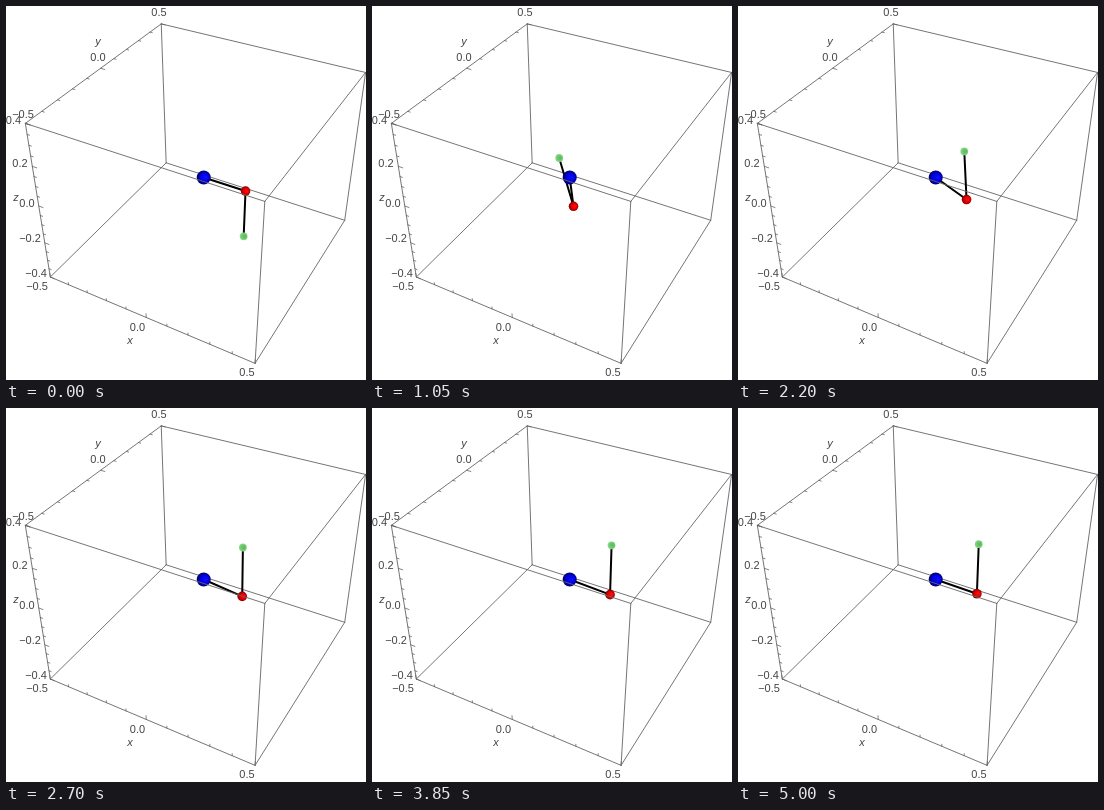
Write an HTML page with a canvas that moves like this. It is 360 by 374 pixels and loops after 5.05 s.

```html
<!DOCTYPE html>
<html>
<head>
<meta charset="utf-8">
<style>
  html, body { margin: 0; width: 100%; height: 100%; overflow: hidden; background: #fff; }
  canvas { display: block; }
</style>
</head>
<body>
<canvas id="stage" width="360" height="374"></canvas>
<script>
const ctx = document.getElementById('stage').getContext('2d');
const ARM = 0.2, ROD = 0.25, RAD = Math.PI / 180;
const STEP = 50, LOOP = 5050;

// Perspective view of a box spanning ±0.5, ±0.5, ±0.4
function project([x, y, z]) {
  const w = 1 - 0.122 * x + 0.212 * y - 0.18 * z;
  return { x: 197.7 + (204 * x + 111 * y) / w, y: 171.5 + (66 * x - 120.4 * y - 187.5 * z) / w, w };
}

function line(a, b, color, width) {
  const p = project(a), q = project(b);
  ctx.strokeStyle = color;
  ctx.lineWidth = width;
  ctx.beginPath();
  ctx.moveTo(p.x, p.y);
  ctx.lineTo(q.x, q.y);
  ctx.stroke();
}

function ball({ at, radius, light, mid, dark }) {
  const { x, y } = project(at);
  const shade = ctx.createRadialGradient(x + radius * 0.4, y, 0, x, y, radius);
  shade.addColorStop(0, light);
  shade.addColorStop(0.6, mid);
  shade.addColorStop(1, dark);
  ctx.fillStyle = shade;
  ctx.beginPath();
  ctx.arc(x, y, radius, 0, 2 * Math.PI);
  ctx.fill();
}

// Box edges; the three meeting at the nearest corner lie in front
const backEdges = [], frontEdges = [];
const half = [0.5, 0.5, 0.4], near = [1, -1, 1];
for (let axis = 0; axis < 3; axis++) {
  const [u, v] = [0, 1, 2].filter(i => i !== axis);
  for (const su of [-1, 1]) for (const sv of [-1, 1]) {
    const a = [], b = [];
    a[axis] = -half[axis];
    b[axis] = half[axis];
    a[u] = b[u] = su * half[u];
    a[v] = b[v] = sv * half[v];
    (su === near[u] && sv === near[v] ? frontEdges : backEdges).push([a, b]);
  }
}

const labels = [
  ['0.5', 153, 7], ['0.0', 92, 52], ['−0.5', 17, 109],
  ['0.4', 7.5, 115], ['0.2', 14, 158], ['0.0', 21, 198], ['−0.2', 24, 233], ['−0.4', 30, 268],
  ['−0.5', 31, 281], ['0.0', 131.5, 322], ['0.5', 241, 367],
  ['y', 92, 36, 'italic'], ['z', 10, 192, 'italic'], ['x', 124, 335, 'italic']
];

function drawEdges(edges) {
  for (const [a, b] of edges) line(a, b, '#666', 0.9);
}

function drawAxes() {
  for (let i = -5; i <= 5; i++) {
    const p = i / 10, size = i % 5 ? 0.012 : 0.022;
    line([p, -0.5, -0.4], [p, -0.5, -0.4 + size], '#666', 0.8);
    line([-0.5, p, 0.4], [-0.5 + size, p, 0.4], '#666', 0.8);
  }
  for (let i = -8; i <= 8; i++) {
    const size = i % 4 ? 0.012 : 0.022;
    line([-0.5, -0.5, i / 20], [-0.5 + size, -0.5, i / 20], '#666', 0.8);
  }
  ctx.fillStyle = '#444';
  ctx.textAlign = 'center';
  ctx.textBaseline = 'middle';
  for (const [text, x, y, style = ''] of labels) {
    ctx.font = `${style} 11px "Liberation Sans", sans-serif`;
    ctx.fillText(text, x, y);
  }
}

// Swing-up angles in degrees at every 0.1 s
const armKeys = [0, -22, -75, -145, -190, -172, -97.6, -11, 97];
const rodKeys = [180, 160, 110, 45, -8, -25, -12.3, -2, 19];

function spline(keys, t) {
  const i = Math.floor(t * 10 + 1e-6), f = t * 10 - i;
  const a = keys[Math.abs(i - 1)], b = keys[i], c = keys[i + 1], d = keys[i + 2];
  return b + f / 2 * (c - a + f * (2 * a - 5 * b + 4 * c - d + f * (3 * (b - c) + d - a)));
}

// Swing-up first, then a damped oscillation with the rod slightly ahead of the arm
function pose(t) {
  if (t < 0.699) return [spline(armKeys, t), spline(rodKeys, t)];
  const size = 73 * Math.exp(-1.1 * (t - 1.124)) + 0.6;
  const phase = Math.PI * (t - 0.841) / 0.2775;
  return [size * Math.cos(phase), 0.2 * size * Math.cos(phase + 0.17)];
}

function draw(ms) {
  const t = Math.floor(ms % LOOP / STEP) * STEP / 1000;
  const [phi, theta] = pose(t).map(deg => deg * RAD);
  const c = Math.cos(phi), s = Math.sin(phi), side = ROD * Math.sin(theta);
  const hub = [0, 0, 0];
  const joint = [ARM * c, ARM * s, 0];
  const tip = [joint[0] - side * s, joint[1] + side * c, ROD * Math.cos(theta)];

  ctx.fillStyle = '#fff';
  ctx.fillRect(0, 0, 360, 374);
  drawEdges(backEdges);
  drawAxes();
  ctx.lineCap = 'round';
  line(hub, joint, '#000', 2);
  line(joint, tip, '#000', 2);
  [
    { at: hub, radius: 7, light: '#1010ff', mid: '#0000e0', dark: '#000060' },
    { at: joint, radius: 4.8, light: '#ff1010', mid: '#e00000', dark: '#800000' },
    { at: tip, radius: 3.9, light: '#58b858', mid: '#6cc86c', dark: '#90d890' }
  ].sort((a, b) => project(b.at).w - project(a.at).w).forEach(ball);
  drawEdges(frontEdges);
}

const start = performance.now();
function tick() {
  draw(performance.now() - start);
  requestAnimationFrame(tick);
}
tick();
</script>
</body>
</html>
```
